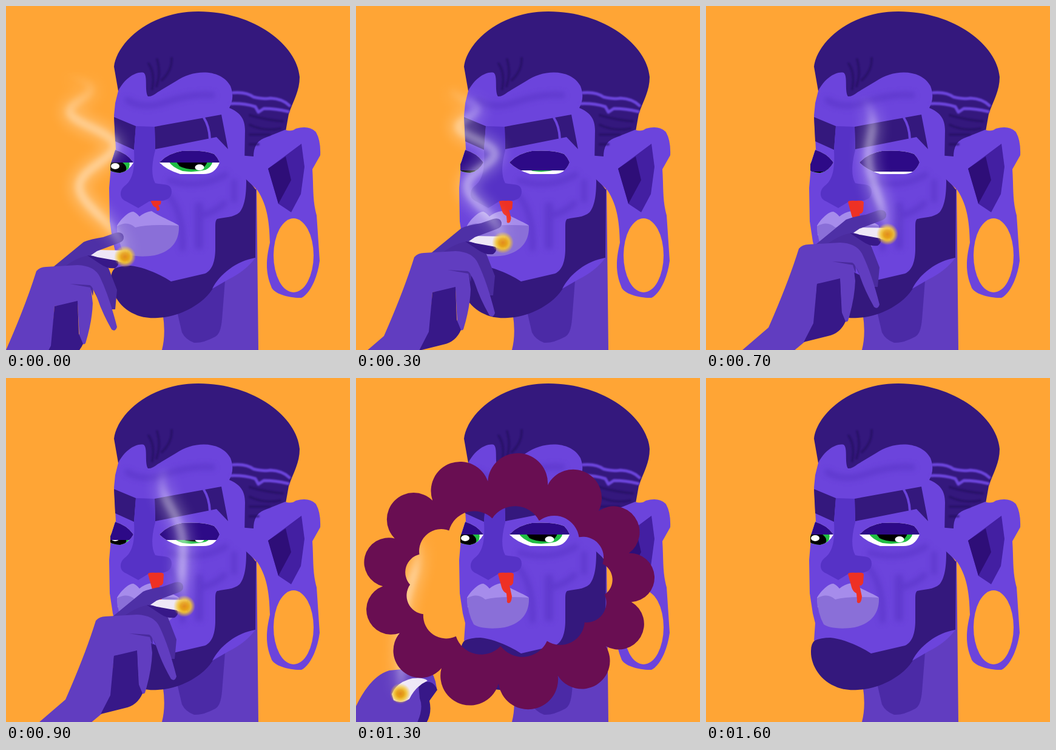
Recreate the animation shown at these times as an HTML page. Size 567 by 567 pixels, loop 1.7 s.

```html
<!DOCTYPE html>
<html lang="en">
<head>
<meta charset="utf-8">
<title>Smoke rings</title>
<style>
  html, body { margin: 0; width: 100%; height: 100%; overflow: hidden; background: #ffa535; }
  svg { display: block; width: 100%; height: 100%; }
  .skin { fill: #6c44dc; }
  .hair { fill: #34187d; }
  .hand { fill: #613dc0; }
  .deep { fill: #371888; }
  .mid { fill: #4a2b9e; }
  .paper { fill: #eee7f6; }
  .puff { fill: #690e52; }
  .lid { fill: #2d0a87; }
  .iris { fill: #20bd43; }
  .white { fill: #fff; }
  .line { fill: none; stroke-linecap: round; stroke-linejoin: round; }
</style>
</head>
<body>
<svg viewBox="0 0 567 567">
  <defs>
    <filter id="fine" filterUnits="userSpaceOnUse" x="0" y="0" width="567" height="567"><feGaussianBlur stdDeviation="1.2"/></filter>
    <filter id="soft" filterUnits="userSpaceOnUse" x="0" y="0" width="567" height="567"><feGaussianBlur stdDeviation="4"/></filter>
    <filter id="haze" filterUnits="userSpaceOnUse" x="-40" y="0" width="607" height="567"><feGaussianBlur stdDeviation="9"/></filter>
    <linearGradient id="fade" x1="0" y1="0" x2="0" y2="1">
      <stop offset="0" stop-color="#fff" stop-opacity="0"/>
      <stop offset=".25" stop-color="#fff" stop-opacity=".8"/>
      <stop offset=".8" stop-color="#fff" stop-opacity=".9"/>
      <stop offset="1" stop-color="#fff" stop-opacity=".3"/>
    </linearGradient>
    <radialGradient id="ember">
      <stop offset="0" stop-color="#e08410"/>
      <stop offset=".35" stop-color="#e69f10"/>
      <stop offset=".6" stop-color="#f2c22c" stop-opacity=".9"/>
      <stop offset="1" stop-color="#f2c22c" stop-opacity="0"/>
    </radialGradient>
    <clipPath id="eyeR"><path d="M253 258Q266 243 290 239Q325 237 343 244Q350 251 352 258Q348 268 341 273Q335 277 325 277H287Q264 270 253 258Z"/></clipPath>
    <clipPath id="eyeL"><path d="M172 262L180 237Q200 243 210 258Q203 272 188 275Q176 274 172 271Z"/></clipPath>
  </defs>

  <rect width="567" height="567" fill="#ffa535"/>

  <!-- neck, hair, beard -->
  <path class="hand" d="M258 505Q264 540 257 567H416L413 300L340 400Z"/>
  <path fill="#4b2aa6" d="M361 453L356 517Q354 540 345 545Q325 556 310 555Q296 550 290 538L280 495Z"/>
  <path class="hair" d="M185 140L178 100C182 62 235 9 317 9C410 9 480 65 484 117C484 140 474 155 466 178L461 206L410 250H390L250 190Z"/>
  <path class="hair" d="M394 280L412 303L411 415C380 425 355 445 340 467C325 490 290 512 250 514C200 518 172 480 173 450Q173 437 180 432L260 400L345 340Z"/>
  <path class="skin" d="M340 466C352 442 380 420 411 415Q396 436 366 451Z"/>

  <!-- face and ear -->
  <path class="skin" d="M185 140C195 120 214 107 227 110C234 115 228 140 234 149Q240 150 250 142L280 124C310 103 355 104 370 132C376 148 373 158 368 168C385 175 394 185 394 205L393 262L396 288C396 305 395 328 385 340C375 349 360 348 348 351Q345 353 345 362V400C345 420 340 436 328 441L272 454C250 440 225 430 205 428Q190 428 178 433L180 404L176 388L171 355L170 300L173 265L181 236L178 180L180 160Z"/>
  <path class="skin" d="M384 246L408 248Q408 225 425 218L460 204Q470 208 478 202Q500 196 511 208Q519 222 518 246L505 269C507 300 505 320 512 345L517 420C513 450 500 475 487 481C470 482 440 475 437 462C428 440 428 420 435 390C434 360 432 330 414 303L396 286L384 280Z"/>
  <ellipse cx="474" cy="411" rx="33" ry="61" fill="#ffa535"/>
  <path fill="#431fa2" d="M432 268L487 227L492 265L486 310L470 340L449 326Z"/>
  <path fill="#2e0e78" d="M432 268L461 248L470 287L449 326Z"/>

  <!-- soft shading -->
  <g class="line" stroke="#5630c4" stroke-width="10" filter="url(#soft)" opacity=".55">
    <path d="M200 155Q225 172 265 158T340 147"/>
    <path d="M270 288Q320 302 362 278"/>
    <path d="M268 312Q292 340 291 400"/>
    <path d="M318 330V395" stroke-width="14"/>
    <path d="M376 290V320M322 345Q345 340 360 325"/>
  </g>
  <g class="line" stroke="#24115f" stroke-width="4" filter="url(#fine)" opacity=".6">
    <path d="M235 95Q246 110 241 137M249 88Q256 110 248 132M273 86Q274 106 257 122"/>
    <path d="M402 180Q430 188 456 190M402 196Q425 207 452 202M402 212H434M402 228H416"/>
  </g>
  <g class="line" stroke="#6c44dc" stroke-width="5" filter="url(#fine)">
    <path d="M374 143Q396 141 408 150Q425 154 436 152Q456 153 467 164"/>
    <path d="M370 161Q392 160 411 166L416 175L425 169Q444 169 465 174"/>
  </g>

  <!-- brows, nose, lips -->
  <path class="hair" d="M178 183L214 198L211 237L180 223ZM245 199L355 179L366 236L347 216L246 236Z"/>
  <path class="line" d="M326 184Q335 198 336 219" stroke="#6c44dc" stroke-width="4"/>
  <path fill="#5632c6" d="M214 198L245 199L246 238C240 260 239 280 246 292C260 295 273 292 273 306C273 318 262 322 250 321L236 322L218 333L198 322C187 318 186 305 195 297C212 285 212 260 211 237Z"/>
  <path fill="#a68ceb" d="M183 362C190 350 203 338 210 339Q215 341 220 347Q228 340 240 338C255 348 275 355 285 362L240 385L184 378Z"/>
  <path fill="#8a6fd8" d="M183 363Q200 353 213 365Q235 359 285 362C286 390 270 405 245 411C220 415 200 411 194 406Q184 388 183 363Z"/>

  <!-- eyes -->
  <g clip-path="url(#eyeR)">
    <rect class="white" x="250" y="230" width="105" height="50"/>
    <path class="iris" d="M268 256H341Q338 266 329 270Q310 275 291 272Q274 266 268 256Z"/>
    <path d="M280 256H332Q330 265 320 269Q299 271 286 264Z"/>
    <ellipse class="white" cx="319" cy="266" rx="7.5" ry="5"/>
    <rect class="lid" x="250" y="230" width="105"/>
  </g>
  <g clip-path="url(#eyeL)">
    <rect class="white" x="170" y="230" width="45" height="50"/>
    <path class="iris" d="M172 256H203Q206 266 197 275H172Z"/>
    <path d="M172 258H192Q203 266 195 276H172Z"/>
    <ellipse class="white" cx="180" cy="264" rx="7" ry="5"/>
    <rect class="lid" x="170" y="230" width="45"/>
  </g>

  <path id="blood" fill="#ee3124" d="M-13 2Q-12 -1 0 0Q13 -1 13 3L12 17Q10 22 6 21L10 39Q9 50 5 50Q1 50 2 45L1 34Q-5 31 -7 24Z"/>

  <g id="burst" class="puff">
    <ellipse cx="190" cy="369" rx="19" ry="23"/>
    <ellipse cx="233" cy="361" rx="26" ry="42"/>
    <ellipse cx="284" cy="359" rx="25" ry="22"/>
    <ellipse cx="280" cy="389" rx="22" ry="20"/>
  </g>

  <g id="raised">
    <path class="paper" d="M135 411L150 402L200 403V423L168 419Z"/>
    <path fill="#4e30a6" d="M78 430L128 389Q140 384 160 381L180 374Q192 371 194 380Q195 388 185 391L150 404L112 430Z"/>
    <path class="mid" d="M96 430Q120 412 140 411Q160 415 169 432L183 468L180 500H160L130 440Z"/>
    <path class="deep" d="M134 411L184 420Q188 426 180 432Q168 434 155 425Z"/>
    <path class="hand" d="M50 437Q56 430 66 430L118 427Q146 428 155 447Q170 478 183 529Q180 538 174 533Q158 505 150 480Q147 468 140 465L143 490Q142 520 131 556Q125 562 121 545L118 490L80 495L75 567L59 591L0 640H-90L-43 604L0 567Q33 492 50 437Z"/>
    <path class="mid" d="M105 458L138 460Q146 464 143 478L139 464Z"/>
    <path class="deep" d="M80 495L118 486L120 540L127 557Q118 577 98 581L58 591L74 560Z"/>
    <circle cx="196" cy="413" r="18" fill="url(#ember)"/>
  </g>

  <g id="lowered">
    <path class="hand" d="M-30 590L0 541Q24 491 55 482L118 476Q131 490 133 512L119 535Q125 553 116 567L100 640H-30Z"/>
    <path class="deep" d="M103 505Q126 493 134 514L121 532Q126 553 115 570L100 640V570Q112 545 105 528Z"/>
    <path class="paper" d="M59 521Q67 501 93 495Q112 493 118 499Q98 508 88 529Q74 538 62 531Z"/>
    <circle cx="73" cy="520" r="17" fill="url(#ember)"/>
  </g>

  <g id="smoke" class="line" stroke="url(#fade)">
    <path stroke-width="34" filter="url(#haze)" opacity=".25"/>
    <path stroke-width="14" filter="url(#soft)" opacity=".36"/>
  </g>

  <path id="ring" class="puff" fill-rule="evenodd"/>
</svg>
<script>
const STEP = 100, COUNT = 17;
const $ = id => document.getElementById(id);
const lerp = (a, b, p) => a + (b - a) * p;

// Key poses: hand offset, lower lid edge and the smoke's shape
const poses = [
  { k: 0, x: 0, y: 0, lid: 258, lean: -83, rise: 300, sway: 60, curls: 2.15 },
  { k: 3, x: 46, y: -23, lid: 271, lean: -70, rise: 255, sway: 45, curls: 2.5 },
  { k: 5, x: 108, y: -37, lid: 279, lean: -40, rise: 218, sway: 55, curls: 1.05 },
  { k: 9, x: 98, y: -37, lid: 267, lean: -32, rise: 225, sway: -20, curls: 1.05 },
  { k: 11, x: 0, y: 0, lid: 258, lean: 15, rise: 255, sway: -32, curls: 2.1 },
  { k: 13, x: -121, y: 105, lid: 258, lean: 30, rise: 255, sway: 12, curls: 1 },
  { k: 16, x: -280, y: 260, lid: 258, lean: 30, rise: 255, sway: 12, curls: 1 }
];
const low = poses.find(p => p.k === 13);

function poseAt(k) {
  const i = Math.max(1, poses.findIndex(p => p.k >= k));
  const a = poses[i - 1], b = poses[i], part = (k - a.k) / (b.k - a.k);
  return Object.fromEntries(Object.keys(a).map(key => [key, lerp(a[key], b[key], part)]));
}

// A sway that tightens and weakens on the way up
function plume({ x, y, lean, rise, sway, curls }) {
  const points = [];
  for (let u = 0; u <= 1; u += .02) {
    const swing = sway * (1 - .75 * u) * Math.sin(2 * Math.PI * curls * u * u);
    points.push([194 + x + lean * u - swing, 403 + y - rise * u]);
  }
  return 'M' + points.join('L');
}

// Closed row of arcs around an ellipse
function lobes(rx, ry, bulge, n = 13) {
  const cusp = i => {
    const a = (i / n - .353) * 2 * Math.PI;
    return [rx * Math.cos(a), ry * Math.sin(a)];
  };
  let d = 'M' + cusp(0);
  for (let i = 0; i < n; i++) {
    const [x0, y0] = cusp(i), [x1, y1] = cusp(i + 1);
    const r = bulge * Math.hypot(x1 - x0, y1 - y0);
    d += `A${r} ${r} 0 0 1 ${x1} ${y1}`;
  }
  return d + 'Z';
}

const show = (id, on) => $(id).style.display = on ? '' : 'none';
const place = (id, x, y, sx = 1, sy = sx) =>
  $(id).setAttribute('transform', `translate(${x} ${y}) scale(${sx} ${sy})`);

function draw(k) {
  const pose = poseAt(k);
  show('raised', k < 13);
  show('lowered', k >= 13 && k < 15);
  show('smoke', k < 15);
  show('burst', k === 11);
  show('ring', k > 11 && k < 16);

  place('raised', pose.x, pose.y);
  place('lowered', pose.x - low.x, pose.y - low.y);
  place('ring', 251, 336, .6 + .4 * (k - 12));

  const bled = Math.min(1, lerp(.33, 1, k / 5));
  place('blood', 247, 321, (1 + bled) / 2, bled);

  document.querySelectorAll('.lid').forEach(el => el.setAttribute('height', pose.lid - 230));
  for (const path of $('smoke').children) path.setAttribute('d', plume(pose));
}

$('ring').setAttribute('d', lobes(207, 168, .5) + lobes(162, 106, .58));

let last = -1;
const start = performance.now();
function tick() {
  const k = Math.floor((performance.now() - start) / STEP) % COUNT;
  if (k !== last) draw(last = k);
  requestAnimationFrame(tick);
}
tick();
</script>
</body>
</html>
```
